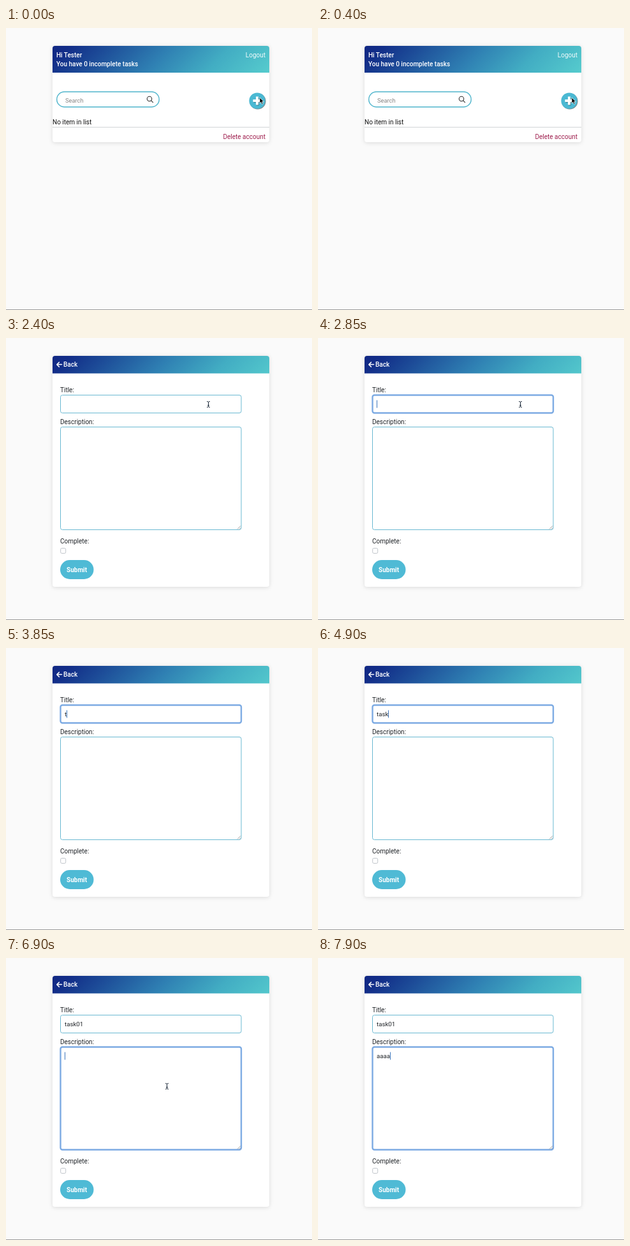
Write an HTML page that moves like this. It is 480 px wide and 442 px high and loops after 8 s.

```html
<!DOCTYPE html>
<html lang="en">
<head>
<meta charset="utf-8">
<title>Task form</title>
<style>
  html, body { margin: 0; width: 100%; height: 100%; overflow: hidden; background: #fafafa; }
  svg { display: block; width: 480px; height: 442px; }
  text { font: 10px Roboto, Arial, sans-serif; fill: #212529; white-space: pre; }
  .head { font-weight: 500; fill: #fff; }
  .end { text-anchor: end; }
  .card { fill: #fff; filter: drop-shadow(0 1px 3px rgba(0, 0, 0, .13)); }
  .field { fill: #fff; stroke: #6bb9d2; }
  .focus { stroke: #7dabe3; stroke-width: 2.4; }
  .line { fill: none; stroke-linecap: round; stroke-linejoin: round; }
  .caret { stroke: #3f78bd; }
</style>
</head>
<body>
<svg viewBox="0 0 480 442">
  <defs>
    <linearGradient id="sea" gradientUnits="userSpaceOnUse" x1="148" y1="-50" x2="338" y2="140">
      <stop offset="0" stop-color="#102682"/>
      <stop offset=".08" stop-color="#122d88"/>
      <stop offset=".5" stop-color="#2f80b3"/>
      <stop offset=".75" stop-color="#42adc3"/>
      <stop offset="1" stop-color="#55cacd"/>
    </linearGradient>
  </defs>
  <rect width="480" height="442" fill="#fafafa"/>

  <g id="list">
    <rect class="card" x="73" y="28" width="340" height="151" rx="4"/>
    <path d="M73 70V32a4 4 0 0 1 4-4h332a4 4 0 0 1 4 4v38z" fill="url(#sea)"/>
    <text class="head" x="79" y="45.5">Hi Tester</text>
    <text class="head" x="79" y="60">You have 0 incomplete tasks</text>
    <text class="end" x="407" y="45.5" style="fill:#f2fbfc">Logout</text>
    <rect x="79.7" y="100" width="160.5" height="23.8" rx="11.9" fill="#fff" stroke="#50b5cc" stroke-width="1.4"/>
    <text x="93" y="116.7" style="font-size:9.3px;fill:#858585">Search</text>
    <g class="line" stroke="#333" stroke-width="1.1">
      <circle cx="225" cy="111" r="3.7"/>
      <path d="M227.8 113.8L230.6 116.6"/>
    </g>
    <circle cx="394.8" cy="114.8" r="12.8" fill="#47656f" opacity=".75"/>
    <circle cx="394" cy="114" r="12.6" fill="#4bb9d3"/>
    <path d="M394.8 108.5v13M388.5 115h13" stroke="#34606c" stroke-width="4.2" opacity=".7"/>
    <path d="M394 107.5v13M387.5 114h13" stroke="#fff" stroke-width="4"/>
    <text x="73" y="151" style="fill:#111">No item in list</text>
    <path d="M73 155.5h340" stroke="#d2d5d6"/>
    <text class="end" x="407" y="174" style="fill:#9f1f4e">Delete account</text>
  </g>

  <g id="form">
    <rect class="card" x="73" y="28" width="340" height="362" rx="4"/>
    <path d="M73 55.5V32a4 4 0 0 1 4-4h332a4 4 0 0 1 4 4v23.5z" fill="url(#sea)"/>
    <path class="line" d="M87.5 41.6H80M83.4 38l-3.6 3.6 3.6 3.6" stroke="#fff" stroke-width="1.5"/>
    <text class="head" x="90" y="45.3">Back</text>
    <text x="85" y="84.8">Title:</text>
    <rect id="titleBox" class="field" x="85.5" y="89.5" width="283.5" height="28" rx="3"/>
    <text id="title" x="92" y="107" style="font-size:9.7px"></text>
    <text x="85" y="134.8">Description:</text>
    <rect id="descBox" class="field" x="85.5" y="139.5" width="283.5" height="161" rx="3"/>
    <path d="M363 299.5l5-5M366 299.5l2-2" stroke="#777" stroke-width=".7"/>
    <text id="desc" x="92" y="156.5" style="font-size:9.7px"></text>
    <path id="caret" class="caret" d="M0 0v12"/>
    <text x="85" y="321.8">Complete:</text>
    <rect x="85.7" y="329.5" width="8" height="8" rx="2" fill="#fff" stroke="#b9bfc4" stroke-width=".9"/>
    <rect x="85" y="348" width="52.5" height="30" rx="15" fill="#4fbad5"/>
    <text id="submit" x="95" y="366.6" style="font-weight:700">Submit</text>
  </g>

  <path id="arrow" d="M0 0v9l2-1.8 1.5 3.2 1.6-.7-1.5-3.1h2.8z" fill="#000" stroke="#fff" stroke-width=".7"/>
  <path id="beam" class="line" d="M-2-4.5q2 0 2 1.2v6.6q0 1.2-2 1.2M2-4.5q-2 0-2 1.2v6.6q0 1.2 2 1.2M-1 1.7h2" stroke="#1d2a3a" stroke-width="1"/>
  <path d="M0 441.5h480" stroke="#9a9a9a"/>
</svg>
<script>
const LOOP = 8000;
const $ = id => document.getElementById(id);

// Each track holds its latest value until the next time.
const titleText = [[0, ''], [3850, 't'], [4000, 'ta'], [4300, 'tas'], [4850, 'task'], [5500, 'task0'], [5650, 'task01']];
const descText = [[0, ''], [7600, 'a'], [7850, 'aaa'], [7900, 'aaaa']];
const focus = [[0, ''], [2850, 'title'], [6850, 'desc']];
const caretOn = [[0, false], [2850, true], [3300, false], [3850, true], [6300, false], [6850, true], [7200, false], [7600, true]];
const pointer = [
  [0, 'arrow', 398, 109], [1850, 'arrow', 390, 108], [1900, 'beam', 352, 106], [2000, 'beam', 325, 105],
  [2400, 'beam', 317, 104], [3850, ''],
  [6300, 'beam', 310, 114], [6400, 'arrow', 300, 128], [6500, 'beam', 278, 160],
  [6600, 'beam', 259, 190], [6700, 'beam', 252, 201], [7600, '']
];

const at = (track, t) => track.findLast(key => key[0] <= t);
const show = (el, on) => el.setAttribute('visibility', on ? 'visible' : 'hidden');
const move = (el, x, y) => el.setAttribute('transform', `translate(${x} ${y})`);

function render(t) {
  const onForm = t >= 1100;
  $('list').style.display = onForm ? 'none' : '';
  $('form').style.display = onForm ? '' : 'none';

  $('title').textContent = at(titleText, t)[1];
  $('desc').textContent = at(descText, t)[1];
  $('submit').style.fill = t < 1850 ? '#0b2266' : '#fff';

  const active = at(focus, t)[1];
  for (const id of ['title', 'desc']) $(id + 'Box').classList.toggle('focus', id === active);

  const blink = onForm && active && at(caretOn, t)[1];
  show($('caret'), blink);
  if (blink) {
    const field = $(active);
    const end = field.textContent ? field.getComputedTextLength() : 0;
    move($('caret'), Math.round(92 + end) + 0.5, active === 'title' ? 97.5 : 147.5);
  }

  const [, kind, x, y] = at(pointer, t);
  for (const id of ['arrow', 'beam']) {
    show($(id), id === kind);
    if (id === kind) move($(id), x + (id === 'beam' ? 0.5 : 0), y);
  }
}

const start = performance.now();
function tick(now) {
  render(Math.max(0, now - start) % LOOP);
  requestAnimationFrame(tick);
}
render(0);
requestAnimationFrame(tick);
</script>
</body>
</html>
```
